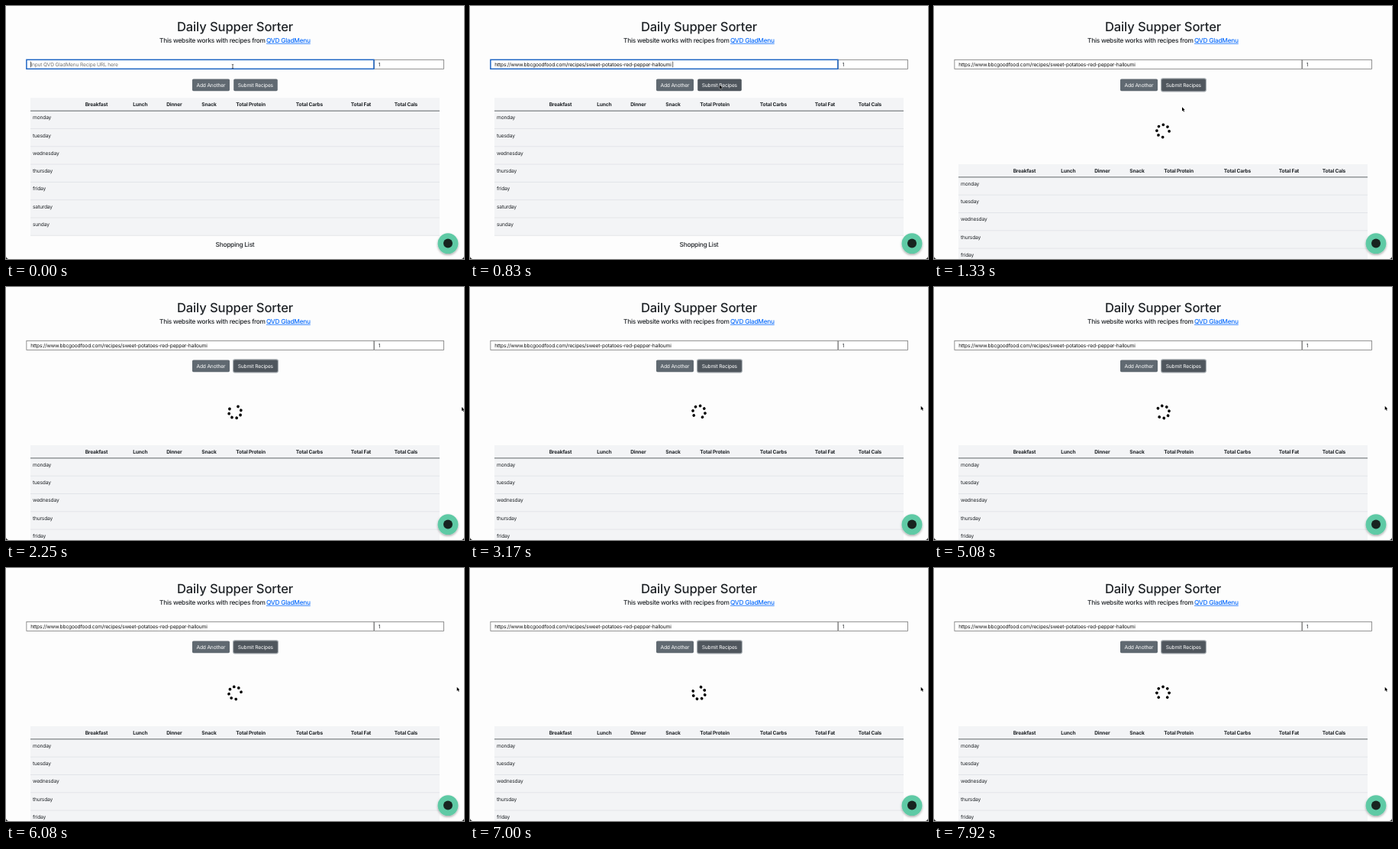
An HTML page for the animation above (8 s loop, 600x331 px).

```html
<!DOCTYPE html>
<html lang="en">
<head>
<meta charset="utf-8">
<title>Daily Supper Sorter</title>
<style>
  html, body { margin: 0; width: 100%; height: 100%; overflow: hidden; background: #fdfdfd; }
  svg { display: block; width: 100%; height: 100%; }
  text {
    font: 400 6.67px Inter, "Open Sans", sans-serif;
    letter-spacing: -.026em;
    fill: #212529;
    text-rendering: geometricPrecision;
  }
  .title { font-size: 16.67px; font-weight: 500; letter-spacing: -.01em; }
  .heading { font-size: 8.33px; font-weight: 500; letter-spacing: -.032em; }
  .link { fill: #0d6efd; text-decoration: underline; }
  .head { font-weight: 700; }
  .mid { text-anchor: middle; }
  .label { fill: #fff; text-anchor: middle; }
  .field { fill: #fff; stroke: #767676; stroke-width: .8; }
</style>
</head>
<body>
<svg viewBox="0 0 600 331">
  <defs>
    <filter id="shadow" x="-30%" y="-30%" width="160%" height="160%">
      <feDropShadow dx="0" dy="1.5" stdDeviation="1.6" flood-opacity=".35"/>
    </filter>
  </defs>

  <text class="title mid" x="300" y="33">Daily Supper Sorter</text>
  <text class="heading" x="201" y="47.8">This website works with recipes from</text>
  <text class="heading link" x="341" y="47.8">QVD GladMenu</text>

  <rect class="field" x="482.6" y="70.3" width="90.8" height="12"/>
  <text x="487.8" y="78.7">1</text>
  <rect class="field" id="recipe" x="26.9" y="70.3" width="455" height="12"/>
  <text id="entry" x="32.3" y="78.7"></text>
  <rect id="caret" y="72.6" width=".6" height="7.6"/>

  <rect x="244" y="95.4" width="49" height="15.8" rx="1.6" fill="#606971"/>
  <text class="label" x="268.4" y="105.7">Add Another</text>
  <rect id="submit" x="298.2" y="95.4" width="57.6" height="15.8" rx="1.6"/>
  <text class="label" x="326.8" y="105.7">Submit Recipes</text>

  <g id="spinner"></g>
  <g id="table"></g>

  <circle cx="579" cy="310.7" r="13.4" fill="#5fcaa5" filter="url(#shadow)"/>
  <circle cx="579" cy="310.5" r="6" fill="#182420"/>
  <path d="M0 328.5V331H2.5Q0 331 0 328.5M600 328.5V331H597.5Q600 331 600 328.5" stroke="#111" stroke-width=".6"/>

  <path id="ibeam" d="M-1.2-2.6Q0-2.6 0-1.8V1.8Q0 2.6-1.2 2.6M1.2-2.6Q0-2.6 0-1.8M0 1.8Q0 2.6 1.2 2.6"
        fill="none" stroke="#222" stroke-width=".7"/>
  <path id="arrow" d="M0 0V5.2L1.2 4.1L2.1 6.1L3 5.7L2.1 3.8H3.7Z"
        fill="#000" stroke="#fff" stroke-width=".5" paint-order="stroke"/>
</svg>
<script>
const LOOP = 8000, PASTE = 330, HOVER = 700, SUBMIT = 920, SPIN = 1600, SHIFT = 86.7;
const PLACEHOLDER = "Input QVD GladMenu Recipe URL here";
const URL_TEXT = "https://www.bbcgoodfood.com/recipes/sweet-potatoes-red-pepper-halloumi";
const $ = id => document.getElementById(id);

function set(node, attributes) {
  for (const [name, value] of Object.entries(attributes)) node.setAttribute(name, value);
}

function add(parent, tag, attributes, content = "") {
  const node = document.createElementNS("http://www.w3.org/2000/svg", tag);
  set(node, attributes);
  node.textContent = content;
  parent.append(node);
}

function buildTable() {
  const table = $("table"), top = 137.2, pitch = 23.3;
  const rule = (y, stroke, width) =>
    add(table, "path", { d: `M32 ${y}H568`, stroke, "stroke-width": width });
  const columns = {
    "Breakfast": 118.5, "Lunch": 175.8, "Dinner": 220.4, "Snack": 266,
    "Total Protein": 320.6, "Total Carbs": 397.5, "Total Fat": 465, "Total Cals": 524
  };
  add(table, "rect", { x: 32, y: 120.3, width: 536, height: top + 7 * pitch - 120.3, fill: "#f3f4f6" });
  for (const [name, x] of Object.entries(columns))
    add(table, "text", { class: "head mid", x, y: 131 }, name);
  ["monday", "tuesday", "wednesday", "thursday", "friday", "saturday", "sunday"].forEach((day, i) => {
    add(table, "text", { x: 35, y: 148.2 + i * pitch }, day);
    rule(top + (i + 1) * pitch, "#dcdfe3", .7);
  });
  rule(top, "#3c4045", .8);
  add(table, "text", { class: "heading mid", x: 300, y: 314.7 }, "Shopping List");
}

// Eight places on a ring, the one at the upper right left empty.
function buildSpinner() {
  for (let i = 0; i < 8; i++) {
    if (i === 1) continue;
    const angle = i * Math.PI / 4;
    add($("spinner"), "circle", { cx: 8.12 * Math.sin(angle), cy: -8.12 * Math.cos(angle), r: 1.88 });
  }
}

// Each stop: time, x, y.
const pointerPath = [
  [0, 297, 79], [330, 297, 79], [750, 327, 103], [1000, 327, 104], [1330, 325, 132.3],
  [1670, 332, 139], [2250, 597, 157], [2600, 597, 157], [2900, 590.7, 155.7]
];

function pointerAt(t) {
  const next = pointerPath.findIndex(stop => stop[0] > t);
  if (next < 0) return pointerPath.at(-1).slice(1);
  const [t0, x0, y0] = pointerPath[next - 1], [t1, x1, y1] = pointerPath[next];
  const p = (t - t0) / (t1 - t0), eased = p * p * (3 - 2 * p);
  return [x0 + (x1 - x0) * eased, y0 + (y1 - y0) * eased];
}

function draw(now) {
  const t = now % LOOP, pasted = t >= PASTE, submitted = t >= SUBMIT;
  const [x, y] = pointerAt(t), inField = y < 83;

  $("entry").textContent = pasted ? URL_TEXT : PLACEHOLDER;
  $("entry").style.fill = pasted ? "#111" : "#757575";
  $("recipe").style.stroke = submitted ? "#767676" : "#2066c4";
  $("recipe").style.strokeWidth = submitted ? .8 : 1.5;
  set($("caret"), { x: pasted ? 265.5 : 32.2, visibility: submitted ? "hidden" : "visible" });

  set($("submit"), {
    fill: t >= HOVER ? "#4f565d" : "#606971",
    stroke: submitted ? "#a5abb0" : "none",
    "stroke-width": 2.4,
    "paint-order": "stroke"
  });

  set($("table"), { transform: `translate(0 ${submitted ? SHIFT : 0})` });
  set($("spinner"), {
    visibility: submitted ? "visible" : "hidden",
    transform: `translate(300 163.5) rotate(${(t - SUBMIT) / SPIN * 360})`
  });

  set($("ibeam"), { transform: `translate(${x} ${y})`, visibility: inField ? "visible" : "hidden" });
  set($("arrow"), { transform: `translate(${x} ${y})`, visibility: inField ? "hidden" : "visible" });
}

buildTable();
buildSpinner();
const start = performance.now();
function tick() {
  draw(performance.now() - start);
  requestAnimationFrame(tick);
}
tick();
</script>
</body>
</html>
```
